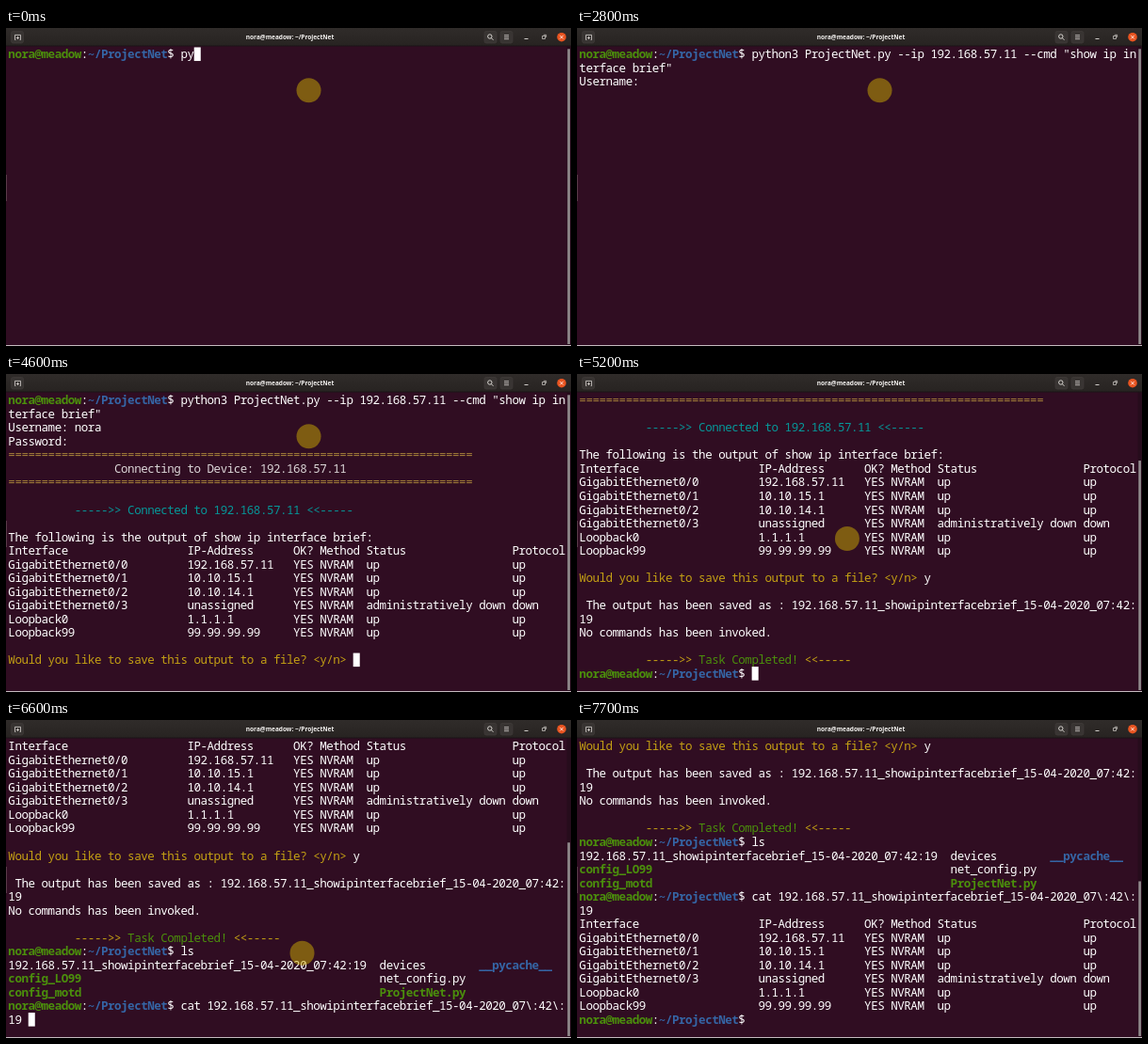
An HTML page with a canvas that plays this animation: 600 by 338 pixels, repeating every 7.8 s.

```html
<!DOCTYPE html>
<html lang="en">
<head>
<meta charset="utf-8">
<title>Terminal session</title>
<style>
html, body { margin: 0; width: 100%; height: 100%; overflow: hidden; background: #300d22; }
canvas { display: block; }
</style>
</head>
<body>
<canvas id="stage" width="600" height="338"></canvas>
<script>
const ctx = document.getElementById('stage').getContext('2d');
const LOOP = 7800, STEP = 100;
const COLS = 84, ROWS = 21, CELL_W = 7.04, CELL_H = 14.53, LEFT = 2.6, TOP = 20.8;
const WHITE = '#ffffff', GREY = '#dcd6d8', GREEN = '#4b8f0c', BLUE = '#3566a6',
      YELLOW = '#c4a014', CYAN = '#06989a', RULE = '#a5803a';
const USER = 'nora', HOST = USER + '@meadow', IP = '192.168.57.11';
const FILE = IP + '_showipinterfacebrief_15-04-2020_';

const tableRow = (...cells) =>
  cells.map((cell, i) => cell.padEnd([27, 16, 4, 7, 22, 0][i])).join('') + '\n';
const TABLE = tableRow('Interface', 'IP-Address', 'OK?', 'Method', 'Status', 'Protocol') + [
  ['GigabitEthernet0/0', IP],
  ['GigabitEthernet0/1', '10.10.15.1'],
  ['GigabitEthernet0/2', '10.10.14.1'],
  ['GigabitEthernet0/3', 'unassigned', 'administratively down', 'down'],
  ['Loopback0', '1.1.1.1'],
  ['Loopback99', '99.99.99.99'],
].map(([name, ip, status = 'up', protocol = 'up']) =>
  tableRow(name, ip, 'YES', 'NVRAM', status, protocol)).join('');

// Each key is [time, ...values]; values are interpolated linearly.
function along(keys, t) {
  let i = 0;
  while (i < keys.length - 2 && t >= keys[i + 1][0]) i++;
  const [a, b] = [keys[i], keys[i + 1]];
  const u = Math.min(1, Math.max(0, (t - a[0]) / (b[0] - a[0])));
  return a.slice(1).map((v, k) => v + (b[k + 1] - v) * u);
}

// Session entries: appearance time, text, colour, bold, typing keys.
const out = (at, text, color = WHITE, bold = false) => ({ at, text, color, bold });
const typed = (text, ...keys) => ({ at: keys[0][0], text, color: WHITE, bold: false, keys });
const prompt = at => [
  out(at, HOST, GREEN, true), out(at, ':'), out(at, '~/ProjectNet', BLUE, true), out(at, '$ '),
];
const pad = n => ' '.repeat(n);
const rule = '='.repeat(70) + '\n';

const SESSION = [
  ...prompt(0),
  typed(`python3 ProjectNet.py --ip ${IP} --cmd "show ip interface brief"`,
    [0, 2], [800, 32], [1500, 47], [2400, 72]),
  out(2600, '\nUsername: '),
  typed(USER, [2900, 0], [3200, 4]),
  out(3300, '\nPassword: '),
  out(3500, '\n' + rule, RULE),
  out(3500, `${pad(16)}Connecting to Device: ${IP}\n`, GREY),
  out(3500, rule, RULE),
  out(3800, `\n${pad(10)}----->> Connected to ${IP} <<-----\n`, CYAN),
  out(4000, '\nThe following is the output of show ip interface brief:\n' + TABLE),
  out(4000, '\nWould you like to save this output to a file? <y/n> ', YELLOW),
  out(4900, 'y'),
  out(5000, `\n\n The output has been saved as : ${FILE}07:42:19\n`),
  out(5100, 'No commands has been invoked.\n'),
  out(5200, `\n${pad(10)}----->> `, YELLOW),
  out(5200, 'Task Completed!', GREEN),
  out(5200, ' <<-----\n', YELLOW),
  ...prompt(5200),
  typed('ls', [5300, 0], [5500, 2]),
  out(5600, `\n${FILE}07:42:19  devices${pad(8)}`),
  out(5600, '__pycache__', BLUE, true),
  out(5600, '\nconfig_LO99' + pad(45), GREEN, true),
  out(5600, 'net_config.py\n'),
  out(5600, `config_motd${pad(45)}ProjectNet.py\n`, GREEN, true),
  ...prompt(5600),
  typed('cat 192', [5800, 0], [6300, 7]),
  out(6500, `${FILE.slice(3)}07\\:42\\:19 `),
  out(6900, '\n' + TABLE),
  ...prompt(6900),
];

const CURSOR_OFF = [[2700, 2900], [4100, 4300], [4400, 4600], [5600, 5800], [6900, 7200], [7500, 7800]];
const POINTER = [
  [0, 321.5, 66.3], [4800, 321.5, 66.3], [5500, 261, 256.5], [5700, 261, 256.5],
  [6500, 314.5, 247.8], [6700, 314.5, 247.8], [7100, 269, 302], [7500, 266, 354],
];

function layOut(t) {
  const glyphs = [];
  let row = 0, col = 0;
  for (const { at, text, color, bold, keys } of SESSION) {
    if (t < at) break;
    const shown = keys ? text.slice(0, Math.round(along(keys, t)[0])) : text;
    for (const char of shown) {
      if (char === '\n' || col === COLS) { row++; col = 0; }
      if (char !== '\n') glyphs.push({ char, color, bold, row, col: col++ });
    }
  }
  return { glyphs, row, col };
}

function rect(color, x, y, w, h) {
  ctx.fillStyle = color;
  ctx.fillRect(x, y, w, h);
}

function disc(color, x, y, r) {
  ctx.fillStyle = color;
  ctx.beginPath();
  ctx.arc(x, y, r, 0, 2 * Math.PI);
  ctx.fill();
}

function stroke(path, color = '#e4e0dc', width = 0.9) {
  ctx.strokeStyle = color;
  ctx.lineWidth = width;
  ctx.stroke(new Path2D(path));
}

function drawTitleBar() {
  const shade = ctx.createLinearGradient(0, 0, 0, 19);
  shade.addColorStop(0, '#302c2a');
  shade.addColorStop(1, '#272321');
  rect(shade, 0, 0, 600, 19);
  rect('#1a1516', 0, 18.5, 600, 1);
  for (const x of [5.5, 508, 525]) {
    ctx.fillStyle = '#383432';
    ctx.beginPath();
    ctx.roundRect(x, 3.5, 13, 12.5, 2);
    ctx.fill();
    ctx.strokeStyle = '#443f3d';
    ctx.lineWidth = 0.6;
    ctx.stroke();
  }
  stroke('M10.4 12.6H9.5V7.4H15.5V12.6H14.6M12.5 8.9V12.1M10.9 10.5H14.1', '#d8d4d0', 0.8);
  stroke('M516 9a2.2 2.2 0 1 1-4.4 0a2.2 2.2 0 1 1 4.4 0M515.4 10.7L517.5 12.8');
  stroke('M529 7.7H534M529 9.7H534M529 11.7H534', '#d8d4d0', 0.8);
  stroke('M550.5 11.5H554.5');
  stroke('M569.5 8.5H572.5V11.5H569.5ZM570.8 7.3H573.6V10', '#d8d4d0', 0.7);
  disc('#e95420', 590, 9.7, 4.8);
  stroke('M588.2 7.9L591.8 11.5M591.8 7.9L588.2 11.5', '#fff', 0.8);
  ctx.fillStyle = '#f4f2f0';
  ctx.font = 'bold 6.5px "Noto Sans", sans-serif';
  ctx.textAlign = 'center';
  ctx.fillText(HOST + ': ~/ProjectNet', 301.5, 12.4);
}

function draw(t) {
  const { glyphs, row, col } = layOut(t);
  const first = Math.max(0, row + 1 - ROWS);
  const cellX = c => LEFT + c * CELL_W;
  const cellY = r => TOP + (r - first) * CELL_H;

  rect('#300d22', 0, 0, 600, 338);
  rect('#5a3a4a', 0, 156, 1, 28);

  ctx.textAlign = 'center';
  for (const g of glyphs) {
    if (g.row < first || g.char === ' ') continue;
    ctx.font = (g.bold ? 'bold ' : '') + '12.5px "Noto Sans Mono", monospace';
    ctx.fillStyle = g.color;
    ctx.fillText(g.char, cellX(g.col + 0.5), cellY(g.row) + 11.5);
  }
  if (!CURSOR_OFF.some(([from, to]) => t >= from && t < to)) {
    rect('#fff', cellX(Math.min(col, COLS - 1)), cellY(row) - 0.3, CELL_W, CELL_H);
  }

  const thumb = 22.3 + 314 * first / (row + 1);
  rect('#260c1c', 595.5, 19, 4.5, 318);
  rect('#938c8f', 596.3, thumb, 2.6, 336 - thumb);
  rect('#c4babe', 0, 337, 600, 1);
  drawTitleBar();

  const [x, y] = along(POINTER, t);
  disc('rgba(204, 172, 2, 0.5)', x, y, 13);
}

function tick(now) {
  draw(Math.floor(now % LOOP / STEP) * STEP);
  requestAnimationFrame(tick);
}
tick(performance.now());
</script>
</body>
</html>
```
